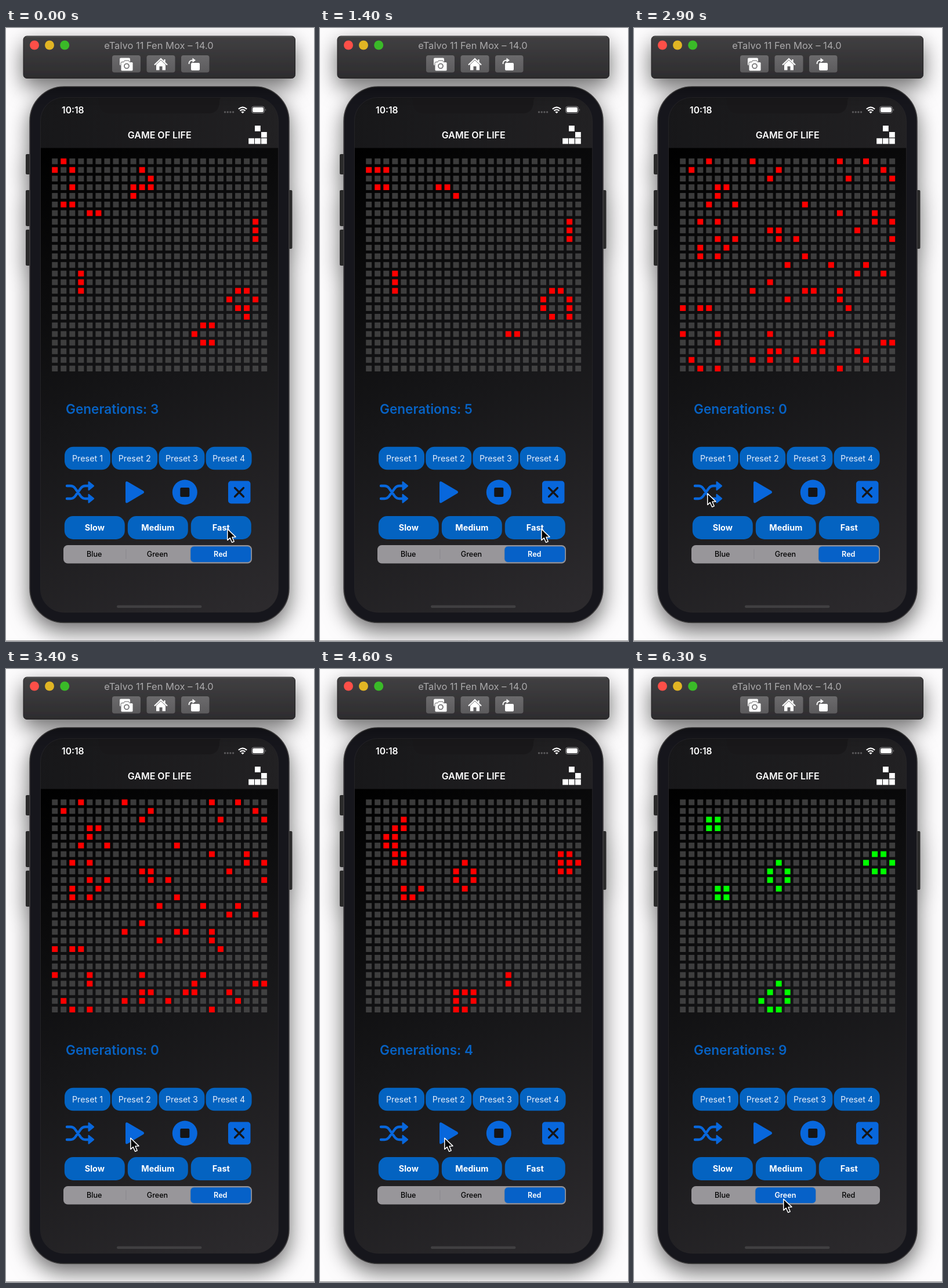
Write an HTML page that moves like this. It is 531 px wide and 1055 px high and loops after 6400 ms.

```html
<!DOCTYPE html>
<html lang="en">
<head>
<meta charset="utf-8">
<title>Game of Life</title>
<style>
  html, body { margin: 0; width: 100%; height: 100%; overflow: hidden; background: #fdfcfd; }
  svg { display: block; width: 100vw; height: 100vh; font-family: Inter, Roboto, sans-serif; }
  .mid { text-anchor: middle; }
  .preset { font-size: 14.3px; fill: #e6eefa; }
  .speed { font-size: 14.4px; font-weight: 700; fill: #fff; }
  .seg { font-size: 12.6px; font-weight: 500; fill: #000; }
  .btn { fill: #0463c1; }
  .icon { fill: #0867dc; }

  #cursor { animation: cursor 6.4s infinite; }
  #thumb { animation: thumb 6.4s infinite; }
  #green { animation: green 6.4s infinite; }
  #red { animation: red 6.4s infinite; }
  #split { animation: split 6.4s infinite step-end; }

  @keyframes cursor {
    0%, 35.2% { transform: translate(381px, 861px); animation-timing-function: ease-in-out; }
    43%, 46.1% { transform: translate(126px, 800px); animation-timing-function: ease-in-out; }
    52.3%, 78.9% { transform: translate(214px, 806px); animation-timing-function: ease-in-out; }
    84.5% { transform: translate(259px, 914px); }
    87%, 100% { transform: translate(257px, 911px); }
  }
  @keyframes thumb {
    0%, 90.6% { transform: none; animation-timing-function: ease-in-out; }
    94.5%, 100% { transform: translateX(-109px); }
  }
  @keyframes green {
    0%, 87.2% { fill: #000; font-weight: 500; }
    88.6%, 90.6% { fill: #6b696c; font-weight: 500; }
    93%, 100% { fill: #fff; font-weight: 600; }
  }
  @keyframes red {
    0%, 90.6% { fill: #fff; font-weight: 600; }
    93%, 100% { fill: #000; font-weight: 500; }
  }
  @keyframes split {
    0% { opacity: 1; }
    91%, 100% { opacity: 0; }
  }
</style>
</head>
<body>
<svg viewBox="0 0 531 1055" preserveAspectRatio="none">
  <defs>
    <linearGradient id="bar" x2="0" y2="1">
      <stop stop-color="#414042"/><stop offset="1" stop-color="#2d2c2e"/>
    </linearGradient>
    <linearGradient id="tool" x2="0" y2="1">
      <stop stop-color="#6b6a6c"/><stop offset="1" stop-color="#5c5b5d"/>
    </linearGradient>
    <linearGradient id="nav" gradientUnits="userSpaceOnUse" x1="60" y1="120" x2="469" y2="206">
      <stop stop-color="#171719"/><stop offset="1" stop-color="#222123"/>
    </linearGradient>
    <linearGradient id="page" gradientUnits="userSpaceOnUse" x1="60" y1="206" x2="469" y2="1005">
      <stop stop-color="#000"/><stop offset=".5" stop-color="#161618"/><stop offset="1" stop-color="#2d2b2e"/>
    </linearGradient>
    <filter id="shadow" filterUnits="userSpaceOnUse" x="-60" y="-60" width="651" height="1200">
      <feDropShadow dx="0" dy="14" stdDeviation="18" flood-opacity=".58"/>
    </filter>
    <clipPath id="screen"><rect x="60" y="120" width="409.5" height="885.5" rx="40"/></clipPath>
  </defs>

  <rect width="531" height="1055" fill="#fdfcfd"/>

  <!-- phone -->
  <g filter="url(#shadow)">
    <g fill="#2b2a2c">
      <rect x="34" y="217" width="10" height="35" rx="2"/>
      <rect x="34" y="279" width="10" height="62" rx="2"/>
      <rect x="34" y="347" width="10" height="62" rx="2"/>
      <rect x="484" y="279" width="9.5" height="101" rx="2"/>
    </g>
    <rect x="41" y="101" width="447" height="922.5" rx="59" fill="#19181a" stroke="#403f41" stroke-width="1.6"/>
  </g>
  <g clip-path="url(#screen)">
    <rect x="60" y="120" width="410" height="87" fill="url(#nav)"/>
    <rect x="60" y="206.5" width="410" height="800" fill="url(#page)"/>
    <path d="M154 119q6 0 6 7 0 21 20 21H348q20 0 20-21 0-7 6-7z" fill="#19181a"/>
  </g>
  <rect x="59.5" y="119.5" width="410" height="886" rx="40" fill="none" stroke="#2b2a2c" stroke-width=".7"/>

  <!-- window bar -->
  <g filter="url(#shadow)">
    <rect x="30" y="14" width="468.5" height="72.5" rx="6" fill="url(#bar)" stroke="#222123"/>
  </g>
  <path d="M35 15H493" stroke="#5d5c5e"/>
  <circle cx="49" cy="29.5" r="8" fill="#fe4f48"/>
  <circle cx="75" cy="29.5" r="8" fill="#e1b524"/>
  <circle cx="101.200" cy="29.5" r="8" fill="#3aba28"/>
  <text class="mid" x="263.500" y="35.500" font-size="16.5" fill="#aaa9ab">eTalvo 11 Fen Mox – 14.0</text>
  <g fill="url(#tool)">
    <rect x="183" y="47" width="49" height="29.500" rx="4"/>
    <rect x="242.500" y="47" width="49" height="29.500" rx="4"/>
    <rect x="302" y="47" width="48.500" height="29.500" rx="4"/>
  </g>
  <g fill="#fff">
    <rect x="196" y="51.500" width="18" height="13" rx="2"/>
    <path d="M200 58.500h3l1.500-2.500h7l1.500 2.500h4q2 0 2 2V72q0 2-2 2H200q-2 0-2-2V60.500q0-2 2-2z" stroke="#656466"/>
    <circle cx="208" cy="65.500" r="4" fill="none" stroke="#656466" stroke-width="1.600"/>
    <path d="M259 63l8-7.500 8 7.500v9.500h-5.500V66h-5v6.500H259z"/>
    <path d="M256 63.500L267 53l11 10.500M273.500 54v5" fill="none" stroke="#fff" stroke-width="2.200"/>
    <rect x="319" y="60" width="15" height="13" rx="2"/>
    <path d="M315.500 62q-.5-6.500 7-6.500" fill="none" stroke="#fff" stroke-width="1.800"/>
    <path d="M321.500 51.500l5.500 4-5.500 4z"/>
  </g>

  <!-- status and navigation -->
  <text x="96" y="147" font-size="15.700" font-weight="600" fill="#fff">10:18</text>
  <g fill="#59585a">
    <circle cx="377.500" cy="144.800" r="1.700"/><circle cx="382.200" cy="144.800" r="1.700"/>
    <circle cx="386.900" cy="144.800" r="1.700"/><circle cx="391.600" cy="144.800" r="1.700"/>
  </g>
  <g fill="none" stroke="#fff" stroke-width="2.100">
    <path d="M400.800 139.500q7.200-6.400 14.400 0M403.500 142.400q4.500-3.800 9 0"/>
  </g>
  <path d="M405.300 144.400q2.700-2 5.400 0L408 147z" fill="#fff"/>
  <rect x="423.500" y="135" width="22" height="11.500" rx="3.500" fill="none" stroke="#8b8a8c"/>
  <rect x="425" y="136.500" width="19" height="8.500" rx="2.200" fill="#fff"/>
  <path d="M447 138.800q1.800 2 0 4z" fill="#8b8a8c"/>
  <text class="mid" x="264.700" y="190" font-size="16" font-weight="600" fill="#fff">GAME OF LIFE</text>
  <path d="M429 168h9.800v9.800h-9.800zM440 179h9.800v9.600h-9.800zM418.200 189.800h9.800v9.800h-9.800zM429 189.800h9.800v9.800h-9.800zM440 189.800h9.800v9.800h-9.800z" fill="#fff"/>

  <g id="grid"></g>
  <text id="count" x="103" y="663.500" font-size="22.600" font-weight="600" fill="#0762c3">Generations: 3</text>

  <g id="buttons"></g>

  <!-- controls -->
  <g fill="none" stroke="#0867dc" stroke-width="4.400" stroke-linecap="round" stroke-linejoin="round">
    <path d="M105 788h6q5 0 8 4l10 14q3 4 8 4h6M105 810h6q5 0 8-4l10-14q3-4 8-4h6"/>
  </g>
  <path class="icon" d="M141.500 781.500q0-2 2-1l8 6.500q1.500 1 0 2.200l-8 6.500q-2 1-2-1zM141.500 803.200q0-2 2-1l8 6.500q1.500 1 0 2.200l-8 6.500q-2 1-2-1z"/>
  <path class="icon" d="M206 783q0-4 3.600-2.200l27 15.600q3 2.300 0 4.700l-27 15.800q-3.600 1.700-3.600-2z"/>
  <circle class="icon" cx="308.300" cy="799" r="21.500"/>
  <rect x="300.300" y="791" width="16" height="16" rx="2" fill="#151517"/>
  <rect class="icon" x="383" y="779.500" width="38.500" height="39" rx="5"/>
  <path d="M394.500 791.500l15 15m0-15l-15 15" stroke="#151517" stroke-width="3.200" stroke-linecap="round"/>

  <!-- colour picker -->
  <rect x="99" y="890" width="325" height="31.500" rx="7.500" fill="#98969a"/>
  <path id="split" d="M206.800 897v17" stroke="#8a888c"/>
  <rect id="thumb" x="318" y="892" width="104.500" height="27.500" rx="6" fill="#0661c8" stroke="#7f8796" stroke-width=".7"/>
  <text class="seg mid" x="152.300" y="910.300">Blue</text>
  <text class="seg mid" id="green" x="261" y="910.300">Green</text>
  <text class="seg mid" id="red" x="369.800" y="910.300">Red</text>

  <rect x="191" y="993.500" width="146.500" height="4.500" rx="2.200" fill="#403f41"/>
  <path d="M0 1054.500H531" stroke="#8f8e90"/>

  <path id="cursor" d="M.8 1.200V20.600L5.200 16.600 8.600 24.300 12.200 22.800 8.900 15.300 15 14.900z" fill="#000" stroke="#fff" stroke-width="1.500" stroke-linejoin="round"/>
</svg>

<script>
  const NS = "http://www.w3.org/2000/svg";
  const SIZE = 25, LOOP = 6400, TICK = 330, RECOLOR = 5850;

  function add(parent, tag, attrs, text) {
    const el = document.createElementNS(NS, tag);
    for (const k in attrs) el.setAttribute(k, attrs[k]);
    if (text) el.textContent = text;
    return document.getElementById(parent).appendChild(el);
  }

  function button(x, y, w, h, label, cls) {
    add("buttons", "rect", { class: "btn", x, y, width: w, height: h, rx: 15 });
    add("buttons", "text", { class: cls + " mid", x: x + w / 2, y: y + h / 2 + 5.2 }, label);
  }
  for (let i = 0; i < 4; i++) button(101 + 81.2 * i, 720.8, 79, 39.5, "Preset " + (i + 1), "preset");
  ["Slow", "Medium", "Fast"].forEach((s, i) => button(100.8 + 109 * i, 840, 104, 40, s, "speed"));

  const cells = [];
  for (let i = 0; i < SIZE * SIZE; i++) {
    cells.push(add("grid", "rect", {
      x: 79.2 + 15.04 * (i % SIZE), y: 224.5 + 14.86 * Math.floor(i / SIZE), width: 10, height: 9.9
    }));
  }

  // Rows are split by "/", each lists its live columns.
  function parse(rows) {
    const live = new Set();
    rows.split("/").forEach((row, r) => {
      for (const c of row.split(" ")) if (c) live.add(r * SIZE + +c);
    });
    return live;
  }

  function evolve(live) {
    const near = new Map();
    for (const i of live) {
      const r = Math.floor(i / SIZE), c = i % SIZE;
      for (let y = Math.max(r - 1, 0); y <= Math.min(r + 1, SIZE - 1); y++) {
        for (let x = Math.max(c - 1, 0); x <= Math.min(c + 1, SIZE - 1); x++) {
          const n = y * SIZE + x;
          if (n !== i) near.set(n, (near.get(n) || 0) + 1);
        }
      }
    }
    const next = new Set();
    for (const [i, n] of near) if (n === 3 || (n === 2 && live.has(i))) next.add(i);
    return next;
  }

  const steps = [];
  function run(live, gen, last, start, firstTick) {
    steps.push({ at: start, gen, live });
    for (let at = firstTick; gen < last; at += TICK) {
      live = evolve(live);
      steps.push({ at, gen: ++gen, live });
    }
  }
  run(parse("1/0 2 10/11/2 9 10 11/9/1 2/4 5/23/23/23////3/3/3 21 22/20 23/21 22/22/17 18/16/17 18"),
    3, 5, 0, 250);
  run(parse("3 8 18 21/1 11 23/10 19 24/4 5/4/3 6 14/18 22/2 4 22 24/10 11 20/4 6 11 13 24/2 5/2 4 14/" +
    "12 17 21/20 23/10/8 14 15 18/12 18/0 2 3 19///0 4 10 17/4 16 23 24/10 11 15 16 20/1 8 10 13 21/2 4 18"),
    0, 9, 2900, 3480);

  const count = document.getElementById("count");
  let begin, shown;

  function draw(now) {
    if (begin === undefined) begin = now;
    const t = (now - begin) % LOOP;
    const step = steps.filter(s => s.at <= t).pop();
    const color = t < RECOLOR ? "#fe0000" : "#00ff00";
    const key = step.at + color;
    if (key !== shown) {
      shown = key;
      count.textContent = "Generations: " + step.gen;
      cells.forEach((el, i) => {
        const on = step.live.has(i);
        el.setAttribute("fill", on ? color : "#555");
        el.setAttribute("fill-opacity", on ? 1 : 0.68);
      });
    }
    requestAnimationFrame(draw);
  }
  requestAnimationFrame(draw);
</script>
</body>
</html>
```
